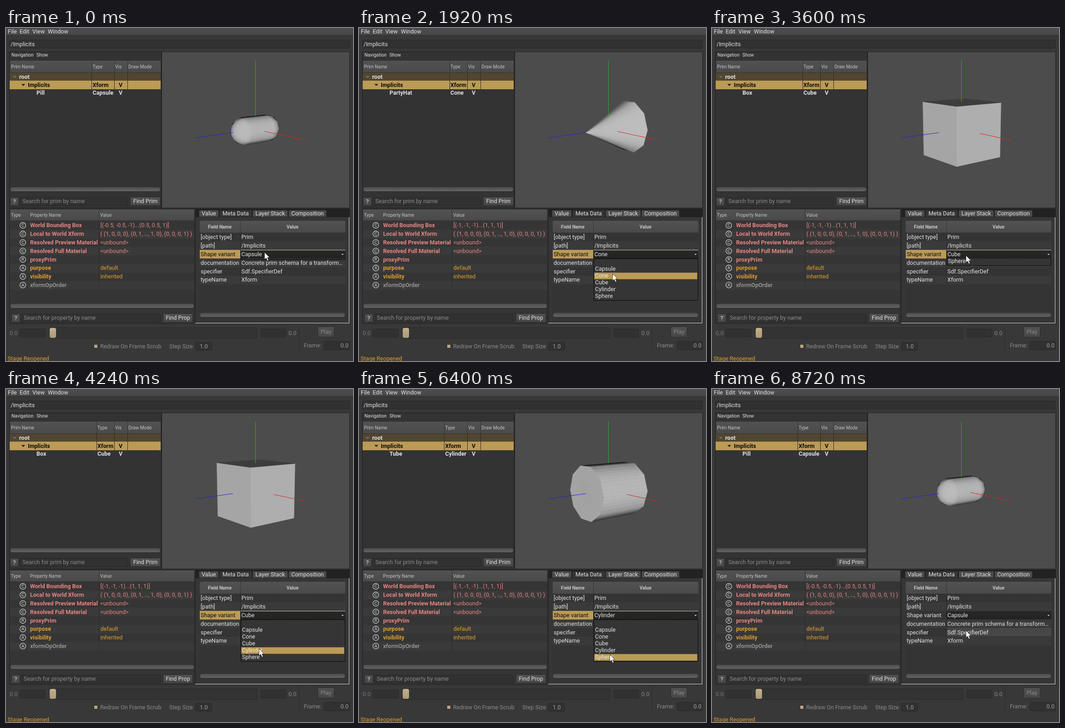
An HTML page with a canvas that plays this animation: 763x734 px, repeating every 8800 ms.

```html
<!DOCTYPE html>
<html lang="en">
<head>
<meta charset="utf-8">
<title>Shape variants</title>
<style>
html, body { margin: 0; width: 100%; height: 100%; overflow: hidden; background: #383838; }
canvas { display: block; }
</style>
</head>
<body>
<canvas id="stage" width="763" height="734"></canvas>
<script>
const g = document.getElementById('stage').getContext('2d');
const LOOP = 8800, STEP = 40, POPUP = 93;
const GOLD = '#bb9b55', LIGHT = '#e3e3e3', DIM = '#8a8a8a', EDGE = '#202020', INK = '#0c0c0c';
const RED = '#e68483', YELLOW = '#de9e2e';
const ITEMS = ['', 'Capsule', 'Cone', 'Cube', 'Cylinder', 'Sphere'];
const NAMES = { Capsule: 'Pill', Cone: 'PartyHat', Cube: 'Box', Cylinder: 'Tube', Sphere: 'Ball' };

// Each pick: popup opens, pointer glides from -> to, picks, then goes back to the next start.
const PICKS = [
  { shape: 'Cone', open: 0, peek: 3, arrive: 800, pick: 1000, back: 1320, from: [568, 494], to: [559, 541] },
  { shape: 'Cube', open: 1640, peek: 10, arrive: 2200, pick: 2920, back: 3200, from: [558, 498], to: [557, 556] },
  { shape: 'Cylinder', open: 3600, peek: 16, arrive: 4240, pick: 4720, back: 5560, from: [558, 501], to: [556, 572] },
  { shape: 'Sphere', open: 5720, peek: 10, arrive: 6400, pick: 6800, back: 7560, from: [562, 498], to: [551, 585] },
  { shape: 'Capsule', open: 7600, peek: 6, arrive: 8120, pick: 8480, back: LOOP, from: [559, 498], to: [558, 532] }
];

function rect(x, y, w, h, fill, line, r = 0) {
  const inset = line ? .5 : 0;
  g.beginPath();
  g.roundRect(x + inset, y + inset, w - inset * 2, h - inset * 2, r);
  if (fill) { g.fillStyle = fill; g.fill(); }
  if (line) { g.strokeStyle = line; g.lineWidth = 1; g.stroke(); }
}
function text(s, x, y, color = LIGHT, size = 12.6, weight = 400, align = 'left') {
  g.font = `${weight} ${size}px Roboto, "Open Sans", sans-serif`;
  g.textAlign = align;
  g.fillStyle = color;
  g.fillText(s, x, Math.round(y + size * .345));
}
const bold = (s, x, y, color = LIGHT, align) => text(s, x, y, color, 12.5, 700, align);
const small = (s, x, y, color = '#c4c4c4') => text(s, x, y, color, 10.2);
const centered = (s, x, y, color) => text(s, x, y, color, 12.6, 400, 'center');

function poly(points, fill) {
  g.beginPath();
  points.forEach(p => g.lineTo(p[0], p[1]));
  g.closePath();
  g.fillStyle = fill;
  g.fill();
}
const triangle = (x, y, r) => [[x - r, y], [x + r, y], [x, y + r]];
function shade(y, h, from, to) {
  const grad = g.createLinearGradient(0, y, 0, y + h);
  grad.addColorStop(0, from);
  grad.addColorStop(1, to);
  return grad;
}

function button(s, x, y, w, h, color = LIGHT) {
  rect(x, y, w, h, shade(y, h, '#525252', '#464646'), '#2a2a2a', 2);
  centered(s, x + w / 2, y + h / 2, color);
}
const field = (x, y, w, h) => rect(x, y, w, h, '#313131', '#282828', 2);
function scrollbar(x, y, w) {
  rect(x, y, w, 10, '#2a2a2a', null, 4);
  rect(x, y, w, 9, shade(y, 9, '#4e4e4e', '#626262'), null, 4);
}
function header(x, y, w, h, cols) {
  rect(x, y, w, h, shade(y, h, '#525252', '#4a4a4a'));
  cols.forEach(c => rect(c, y, 1, h, '#363636'));
}

// The type column grows leftwards to fit its widest entry.
function typeLeft(shape) {
  g.font = '700 12.5px Roboto, "Open Sans", sans-serif';
  return 236 - Math.max(g.measureText('Xform').width, g.measureText(shape).width);
}

function tree(shape) {
  const type = typeLeft(shape), cols = [Math.round(type - 2.6), 238, 267];
  rect(7, 52, 335, 345, '#333', EDGE);
  small('Navigation', 12, 59, LIGHT);
  small('Show', 67, 59, LIGHT);
  header(9, 72, 331, 26, cols);
  small('Prim Name', 11, 85);
  small('Type', type, 85);
  small('Vis', 240, 85);
  small('Draw Mode', 269, 85);
  rect(8, 99, 332, 17, '#514630');
  rect(8, 116, 332, 19, GOLD);
  cols.forEach(c => rect(c, 99, 1, 36, '#2e2a20'));
  poly(triangle(19, 106, 4), '#7d745f');
  poly(triangle(38, 123.5, 4.3), '#1a1a1a');
  bold('root', 29, 108);
  [['Implicits', 48, 'Xform', 125.5, INK], [NAMES[shape], 67, shape, 143, LIGHT]].forEach(([name, x, kind, y, color]) => {
    bold(name, x, y, color);
    bold(kind, type, y, color);
    bold('V', 252, y, color, 'center');
  });
  scrollbar(10, 351, 329);
  button('?', 9, 373, 19, 19);
  field(30, 373, 238, 19);
  text('Search for prim by name', 36, 382, DIM);
  button('Find Prim', 273, 372, 67, 20);
}

function properties(shape) {
  const box = shape === 'Capsule' ? '[(-0.5, -0.5, -1)...(0.5, 0.5, 1)]' : '[(-1, -1, -1)...(1, 1, 1)]';
  const rows = [
    ['C', 'World Bounding Box', box, RED],
    ['C', 'Local to World Xform', '( (1, 0, 0, 0), (0, 1, …, 1, 0), (0, 0, 0, 1) )', RED],
    ['C', 'Resolved Preview Material', '<unbound>', RED],
    ['C', 'Resolved Full Material', '<unbound>', RED],
    ['R', 'proxyPrim', '', RED],
    ['A', 'purpose', 'default', YELLOW],
    ['A', 'visibility', 'inherited', YELLOW],
    ['A', 'xformOpOrder', '', '#909090']
  ];
  rect(7, 398, 408, 254, '#353535', EDGE);
  header(9, 400, 405, 24, [204]);
  small('Type', 11, 412);
  small('Property Name', 53, 412);
  small('Value', 207, 412);
  rows.forEach(([kind, name, value, color], i) => {
    const y = 435 + i * 18.8, top = Math.round(y - 9);
    if (i % 2) rect(9, top, 405, 19, '#3a3a3a');
    rect(204, top, 1, 19, '#2a2a2a');
    g.beginPath();
    g.arc(37, y, 6.4, 0, 7);
    g.strokeStyle = LIGHT;
    g.lineWidth = 1.1;
    g.stroke();
    text(kind, 37, y, LIGHT, 9.5, 400, 'center');
    bold(name, 53, y, color);
    text(value, 207.5, y, color);
  });
  scrollbar(10, 608, 403);
  button('?', 12, 630, 19, 19);
  field(33, 630, 307, 19);
  text('Search for property by name', 39, 639, DIM);
  button('Find Prop', 345, 629, 66, 20);
}

function metadata(shape, popup, pointer) {
  rect(416, 398, 340, 254, '#222', EDGE);
  let left = 424;
  [['Value', 45], ['Meta Data', 73], ['Layer Stack', 79], ['Composition', 85]].forEach(([s, w], i) => {
    rect(left, 401, w - 1, 16, i === 1 ? '#363636' : '#4c4c4c', '#262626', 2);
    centered(s, left + w / 2 - .5, 409);
    left += w;
  });
  rect(417, 417, 338, 233, '#363636');
  rect(754, 417, 1, 234, '#ededed');
  rect(416, 650, 339, 1, '#ededed');
  rect(426, 425, 320, 215, '#343434');
  header(426, 425, 320, 26, [515]);
  text('Field Name', 470, 438, '#c8c8c8', 10.2, 700, 'center');
  text('Value', 630, 438, '#c8c8c8', 10.2, 700, 'center');

  const rows = [['[object type]', 'Prim'], ['[path]', '/Implicits'], ['Shape variant', shape],
    ['documentation', 'Concrete prim schema for a transform…'],
    ['specifier', 'Sdf.SpecifierDef'], ['typeName', 'Xform']];
  rows.forEach(([name, value], i) => {
    const y = 461 + i * 18.8, top = Math.floor(y - 9);
    const combo = i === 2, chosen = popup && combo;
    if (i % 2) rect(426, top, 320, 19, '#3a3a3a');
    if (chosen) rect(426, top, 89, 19, GOLD);
    if (combo) {
      rect(516, 490, 230, 18, shade(490, 18, '#282828', '#222222'));
      if (chosen) rect(516, 489, 230, 1, '#cfc6ae');
      poly(triangle(740, 498, 2.5), LIGHT);
    } else if (!popup && pointer[1] >= top && pointer[1] < top + 19) rect(516, top, 230, 18, '#474747');
    rect(515, top, 1, 19, '#2a2a2a');
    text(name, 428, y, chosen ? INK : LIGHT);
    text(value, 517.5, y);
  });
  scrollbar(427, 628, 318);
  if (popup) dropdown(shape, popup, pointer);
}

function dropdown(shape, height, pointer) {
  const shift = height - POPUP, settled = shift === 0;
  const over = Math.floor((pointer[1] - 508.5) / 15);
  const hot = settled && over >= 0 ? over : ITEMS.indexOf(shape);
  g.save();
  g.beginPath();
  g.rect(515, 508, 232, height + 1);
  g.clip();
  rect(516, 508 + shift, 230, POPUP, '#353535', '#080808');
  ITEMS.forEach((s, i) => {
    const y = 516 + i * 15 + shift;
    if (i === hot) {
      rect(517, y - 7, 227, 15, GOLD);
      g.setLineDash([1, 1]);
      if (settled) rect(517, y - 7, 227, 15, null, 'rgba(70,60,35,.6)');
      g.setLineDash([]);
    }
    text(s, 519, y, i !== hot ? LIGHT : settled ? '#f0eadb' : INK);
  });
  g.restore();
}

function transport() {
  text('0.0', 8, 673, '#777');
  field(30, 663, 57, 19);
  rect(95, 660, 457, 25, '#333', '#292929', 2);
  rect(96, 661, 14, 22, shade(661, 22, '#c4b08a', '#aa9a7a'), null, 4);
  field(560, 663, 56, 19);
  text('0.0', 621, 673, '#858585');
  rect(644, 656, 1, 54, '#2d2d2d');
  button('Play', 685, 658, 37, 24, DIM);
  rect(193, 697, 9, 9, '#b8a680', '#2a2a2a');
  text('Redraw On Frame Scrub', 207, 702, DIM);
  text('Step Size', 359, 702, DIM);
  field(416, 692, 37, 19);
  text('1.0', 426, 702, '#a0a0a0');
  text('Frame:', 655, 700, DIM);
  field(699, 690, 57, 20);
  text('0.0', 753, 700, '#a0a0a0', 12.6, 400, 'right');
  text('Stage Reopened', 3.5, 729, YELLOW);
}

// Perspective camera circling the origin, with a light at the eye.
const YAW = .895, PITCH = .176, DIST = 12.9, FOCAL = 778;
const [cy, sy, cp, sp] = [Math.cos(YAW), Math.sin(YAW), Math.cos(PITCH), Math.sin(PITCH)];
const toEye = ([x, y, z]) => x * sy * cp + y * sp + z * cy * cp;
function project(p) {
  const [x, y, z] = p, k = FOCAL / (DIST - toEye(p));
  return [548.5 + k * (x * cy - z * sy), 223.6 - k * (y * cp - sp * (x * sy + z * cy))];
}
function lit(normal) {
  const n = Math.max(0, toEye(normal)), v = Math.round(22 + 168 * (1 - (1 - n) ** 2));
  return `rgb(${v},${v},${v})`;
}
function facet(corners, normal) {
  const p = corners.map(project);
  const cross = (p[2][0] - p[0][0]) * (p[3][1] - p[1][1]) - (p[2][1] - p[0][1]) * (p[3][0] - p[1][0]);
  if (cross >= 0) return;
  poly(p, lit(normal));
  g.strokeStyle = g.fillStyle;
  g.lineWidth = .6;
  g.stroke();
}

// Ten-sided solid around z; each profile point is [z, radius, normal z, normal radius].
function lathe(profile, sides = 10, cuts = 5) {
  const mix = (a, b, u) => a.map((v, i) => v + (b[i] - v) * u);
  const spoke = i => [Math.cos(i / sides * 2 * Math.PI), Math.sin(i / sides * 2 * Math.PI)];
  const place = (z, r, [x, y]) => [x * r, y * r, z];
  for (let s = 0; s < profile.length - 1; s++)
    for (let i = 0; i < sides * cuts; i++) {
      const side = Math.floor(i / cuts);
      const dir = k => mix(spoke(side), spoke(side + 1), (i % cuts + k) / cuts);
      const mid = dir(.5), len = Math.hypot(...mid);
      for (let j = 0; j < cuts; j++) {
        const at = k => mix(profile[s], profile[s + 1], (j + k) / cuts);
        const [a, b, m] = [at(0), at(1), at(.5)];
        const size = Math.hypot(m[2], m[3] * len);
        facet([place(a[0], a[1], dir(0)), place(a[0], a[1], dir(1)), place(b[0], b[1], dir(1)), place(b[0], b[1], dir(0))],
          place(m[2] / size, m[3] / size, mid));
      }
    }
}
// Round profile from the back pole to the front one, its halves pulled apart by gap.
function round(radius, gap) {
  const points = [];
  for (let i = 0; i <= 10; i++) {
    const a = i * Math.PI / 10, z = -Math.cos(a), r = Math.sin(a);
    if (i <= 5) points.push([z * radius - gap, r * radius, z, r]);
    if (i >= 5) points.push([z * radius + gap, r * radius, z, r]);
  }
  return points;
}
const SOLIDS = {
  Capsule: () => lathe(round(.5, .5)),
  Cone: () => lathe([[-1, 1, .447, .894], [1, 0, .447, .894]]),
  Cube() {
    facet([[-1, -1, 1], [1, -1, 1], [1, 1, 1], [-1, 1, 1]], [0, 0, 1]);
    facet([[1, -1, 1], [1, -1, -1], [1, 1, -1], [1, 1, 1]], [.9, 0, 0]);
    facet([[-1, 1, 1], [1, 1, 1], [1, 1, -1], [-1, 1, -1]], [0, .7, 0]);
  },
  Cylinder() {
    lathe([[-1, 1, 0, 1], [1, 1, 0, 1]]);
    lathe([[1, 1, 1, 0], [1, 0, 1, 0]]);
  },
  Sphere: () => lathe(round(1, 0))
};

function axis(dir, from, color) {
  g.beginPath();
  [from, 2.47].forEach(k => g.lineTo(...project(dir.map(v => v * k))));
  g.strokeStyle = color;
  g.lineWidth = 1;
  g.stroke();
}
function viewport(shape) {
  const reach = shape === 'Capsule' || shape === 'Cone' ? .5 : 1;
  rect(342, 52, 414, 345, '#4c4c4c', EDGE);
  SOLIDS[shape]();
  axis([1, 0, 0], reach, '#d82424');
  axis([0, 1, 0], reach, '#22b422');
  axis([0, 0, 1], 1, '#2222d8');
}

function arrow([x, y]) {
  const outline = [[0, 0], [0, 15.5], [3.6, 12.3], [6.2, 18.3], [8.8, 17.2], [6.3, 11.4], [11, 11.2]];
  poly(outline.map(p => [x + .5 + p[0], y + .5 + p[1]]), '#fff');
  g.strokeStyle = '#222';
  g.lineWidth = .8;
  g.stroke();
}

function glide(a, b, start, end, t) {
  const u = Math.min(1, Math.max(0, (t - start) / (end - start)));
  return a.map((v, i) => Math.round(b[i] + (v - b[i]) * (1 - u) ** 3));
}
function stateAt(t) {
  const i = PICKS.findLastIndex(p => t >= p.open), now = PICKS[i];
  const before = PICKS[(i + 4) % 5].shape;
  if (t >= now.pick) {
    const home = i < 4 ? PICKS[i + 1].from : now.to;
    return { shape: now.shape, popup: 0, pointer: glide(now.to, home, now.pick, now.back, t) };
  }
  const k = (t - now.open) / STEP;
  return {
    shape: before,
    popup: Math.min(POPUP, now.peek + (k < 2 ? 0 : 31 * k)),
    pointer: glide(now.from, now.to, now.open + 120, now.arrive, t)
  };
}

function draw(t) {
  const { shape, popup, pointer } = stateAt(t);
  rect(0, 0, 763, 734, '#383838');
  rect(0, 0, 763, 16, shade(0, 16, '#4e4e4e', '#464646'));
  rect(0, 16, 763, 1, '#2b2b2b');
  [['File', 4], ['Edit', 30], ['View', 58], ['Window', 92]].forEach(([s, x]) => text(s, x, 8));
  field(7, 26, 749, 19);
  text('/Implicits', 10, 36);
  tree(shape);
  viewport(shape);
  properties(shape);
  metadata(shape, popup, pointer);
  transport();
  arrow(pointer);
}

const start = performance.now();
let shown = -1;
function frame() {
  const t = Math.floor((performance.now() - start) % LOOP / STEP) * STEP;
  if (t !== shown) draw(shown = t);
  requestAnimationFrame(frame);
}
frame();
</script>
</body>
</html>
```
